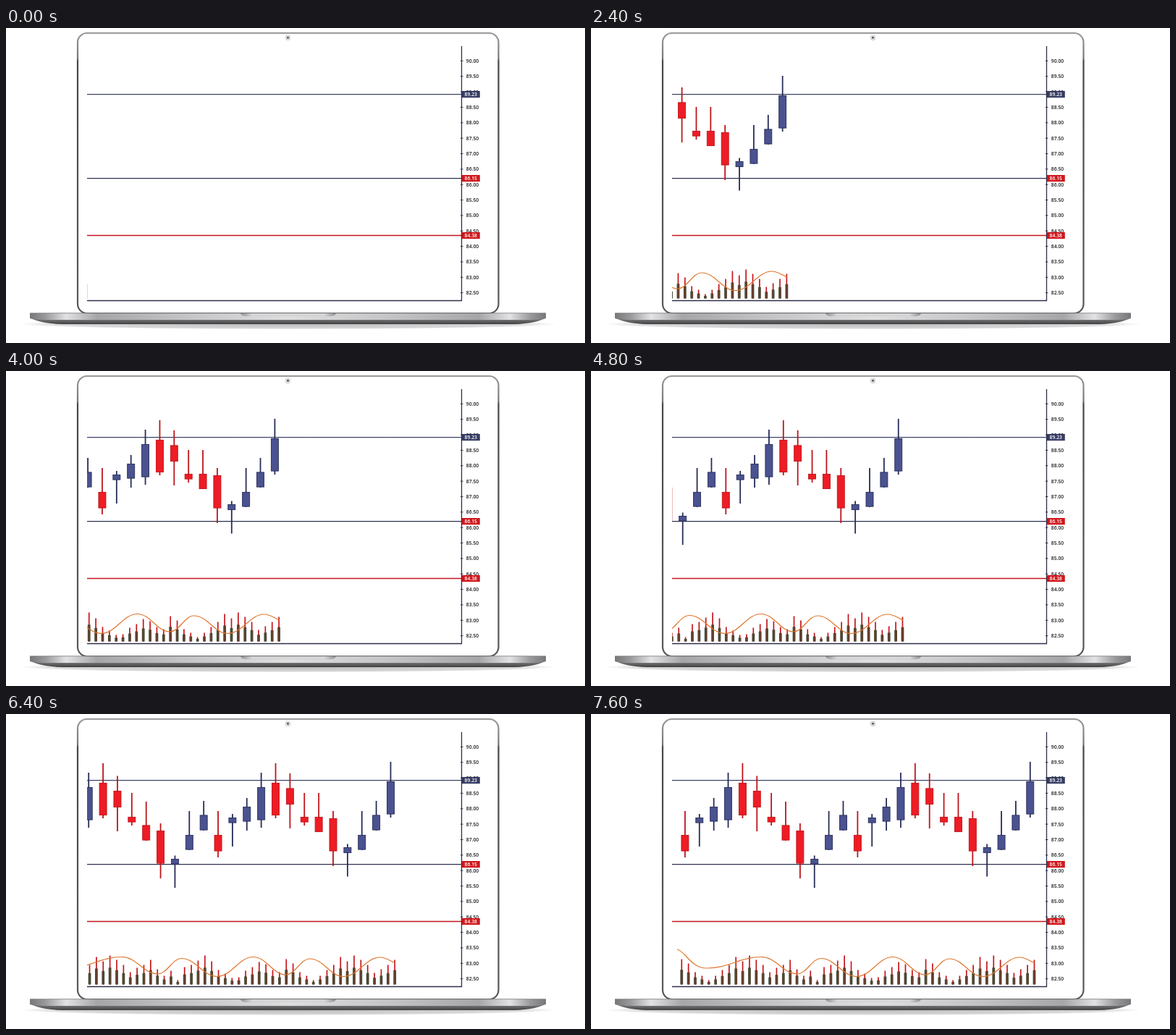
Animation, 800 px wide and 435 px high, one loop 10000 ms. Source, as an HTML page:

```html
<!DOCTYPE html>
<html lang="en">
<head>
<meta charset="utf-8">
<title>Candlestick chart on a laptop</title>
<style>
  html, body { margin: 0; width: 100%; height: 100%; overflow: hidden; background: #fff; }
  svg { display: block; width: 100%; height: 100%; }
  text { font: 600 6.8px "Open Sans", "Noto Sans", sans-serif; fill: #1c1c22; }
  .tag { fill: #fff; }
</style>
</head>
<body>
<svg viewBox="0 0 800 435">
  <defs>
    <linearGradient id="rim" x2="0" y2="1">
      <stop stop-color="#9a9a9c"/><stop offset=".09" stop-color="#77777a"/>
      <stop offset=".1" stop-color="#464649"/><stop offset="1" stop-color="#58585b"/>
    </linearGradient>
    <linearGradient id="deck">
      <stop stop-color="#77777a"/><stop offset=".03" stop-color="#99999c"/>
      <stop offset=".07" stop-color="#e2e2e4"/><stop offset=".13" stop-color="#a6a6a9"/>
      <stop offset=".3" stop-color="#c4c4c6"/><stop offset=".5" stop-color="#dededf"/>
      <stop offset=".7" stop-color="#c4c4c6"/><stop offset=".87" stop-color="#a6a6a9"/>
      <stop offset=".93" stop-color="#e2e2e4"/><stop offset=".97" stop-color="#99999c"/>
      <stop offset="1" stop-color="#77777a"/>
    </linearGradient>
    <linearGradient id="under" x2="0" y2="1">
      <stop stop-color="#8c8c8f"/><stop offset="1" stop-color="#3f3f42"/>
    </linearGradient>
    <linearGradient id="notch">
      <stop stop-color="#8b8b8e"/><stop offset=".12" stop-color="#d4d4d6"/>
      <stop offset=".88" stop-color="#d4d4d6"/><stop offset="1" stop-color="#8b8b8e"/>
    </linearGradient>
    <radialGradient id="shadow">
      <stop stop-color="#bbb"/><stop offset=".85" stop-color="#d8d8d8"/>
      <stop offset="1" stop-color="#fff"/>
    </radialGradient>
    <clipPath id="plot"><path d="M112 20H629V376H112Z"/></clipPath>
  </defs>

  <ellipse cx="390" cy="409" rx="372" ry="7" fill="url(#shadow)"/>
  <rect x="99" y="7" width="581.5" height="387" rx="13" fill="#fff" stroke="url(#rim)" stroke-width="2.2"/>
  <circle cx="389.5" cy="13.5" r="3.4" fill="#e3e3e3" stroke="#bbb" stroke-width=".6"/>
  <circle cx="389.5" cy="13.3" r="1.5" fill="#555"/>
  <path d="M33 400Q46 408 78 409H702Q734 408 746 400Z" fill="url(#under)"/>
  <path d="M33 394H746V401Q739 403 715 403H65Q40 403 33 401Z" fill="url(#deck)"/>
  <path d="M33 393.7H746" stroke="#77777a" stroke-width=".8"/>
  <path d="M324 394H456Q455 398 447 398H333Q325 398 324 394Z" fill="url(#notch)"/>

  <g id="grid" fill="#efefef"></g>
  <g fill="none" stroke-width="1.2">
    <path d="M112 91.6H630" stroke="#3d4369"/>
    <path d="M112 207.6H630" stroke="#2f3352"/>
    <path d="M112 286.5H630" stroke="#c4161c" stroke-width="1.4"/>
  </g>
  <g clip-path="url(#plot)"><g id="series"></g></g>
  <path d="M629.5 25V376.5H112" fill="none" stroke="#2d2f48" stroke-width="1.3"/>
  <g id="axis"></g>
</svg>
<script>
const LOOP = 10000, STEP = 100;
const SPEED = 0.0667, TRAVEL = 502.2;
const LAST_VOLUME_X = 612.5, VOLUME_GAP = 9.37;
const LAST_CANDLE_X = 606.8, CANDLE_GAP = 19.87;
const BLUE = { body: "#4a5290", edge: "#272d57" };
const RED = { body: "#ee1c24", edge: "#bd151b" };

const $ = id => document.getElementById(id);

function add(parent, tag, attrs, text = "") {
  const node = document.createElementNS(parent.namespaceURI, tag);
  for (const key in attrs) node.setAttribute(key, attrs[key]);
  node.textContent = text;
  return parent.appendChild(node);
}

// Each shape: high, body top, body bottom, low.
const shapes = {
  a: [134, 167, 189.5, 198], B: [138, 143, 150.5, 183], C: [116, 128, 148.5, 161],
  D: [81, 101, 146.5, 157], e: [68, 95, 140, 144], f: [85.5, 106, 129, 162],
  g: [109, 142, 149.5, 154], h: [121, 153.5, 174.5, 175], i: [151, 161, 206.5, 227],
  J: [195.5, 200, 207.5, 240], K: [134, 167, 187.5, 188], L: [120, 139.5, 160.5, 161],
  m: [82, 102.5, 125, 158], n: [109, 142, 163, 163], o: [134, 144, 189.5, 210],
  P: [179.5, 184, 192, 224.5], Q: [66, 93, 138.5, 143]
};
const candleOrder = "aBCDefghiJKLaBCDemgnoPKLQ"; // upper case rises, lower case falls

const volumes = [
  35, 29, 17, 12, 6, 12, 20, 27, 38, 32, 40, 34, 27, 17, 23, 27, 34, 21, 12, 19, 6,
  24, 27, 33, 40, 32, 20, 15, 9, 10, 19, 24, 31, 28, 20, 17, 35, 29, 17, 12, 6,
  12, 20, 27, 38, 32, 40, 34, 27, 16, 21, 27, 34
];

const wave = [
  [160, 351], [236, 335.5], [285, 359], [318, 337.5], [367, 362.5], [417, 335.5],
  [462, 360], [495, 338], [542, 362.5], [592, 336], [622, 346]
];

function drawCandles(parent) {
  [...candleOrder].forEach((key, i) => {
    const [high, top, bottom, low] = shapes[key];
    const color = key < "a" ? BLUE : RED;
    const x = LAST_CANDLE_X - CANDLE_GAP * (candleOrder.length - 1 - i);
    add(parent, "path", { d: `M${x} ${high}V${low}`, stroke: color.edge, "stroke-width": 1.8 });
    add(parent, "rect", {
      x: x - 5, y: top + 0.4, width: 10, height: bottom - top - 0.8,
      fill: color.body, stroke: color.edge, "stroke-width": 0.9
    });
  });
}

function drawVolumes(parent) {
  volumes.forEach((height, i) => {
    const x = LAST_VOLUME_X - VOLUME_GAP * (volumes.length - 1 - i);
    const bar = (h, stroke, width) =>
      add(parent, "path", { d: `M${x} 373.5v${-h}`, stroke, "stroke-width": width });
    bar(height, "#c4161c", 1.7);
    bar(height * 0.58, "#4b4a36", 3.8);
    bar(height * 0.58, "#7d3527", 1);
  });
}

function drawWave(parent) {
  let d = "M119 325C130 327 138 351 160 351";
  for (let i = 1; i < wave.length; i++) {
    const [x0, y0] = wave[i - 1], [x1, y1] = wave[i];
    const reach = (x1 - x0) * 0.4;
    d += `C${x0 + reach} ${y0} ${x1 - reach} ${y1} ${x1} ${y1}`;
  }
  add(parent, "clipPath", { id: "waveEnd" });
  add($("waveEnd"), "rect", { x: 110, y: 320, width: 503, height: 50 });
  add(parent, "path", {
    d, fill: "none", stroke: "#e0752a", "stroke-width": 1.2, "clip-path": "url(#waveEnd)"
  });
}

function drawAxis(parent) {
  for (let i = 0; i < 16; i++) {
    const y = 45.4 + i * 21.35;
    add(parent, "path", { d: `M628 ${y}h3.5`, stroke: "#2d2f48" });
    add(parent, "text", { x: 635.8, y: y + 2.5 }, (90 - i / 2).toFixed(2));
    for (const x of [313, 420, 527]) add($("grid"), "rect", { x, y, width: 1, height: 1 });
  }
  const tags = [[91.6, "89.23", "#363c62"], [207.6, "86.15", "#cf181d"], [286.5, "84.38", "#cf181d"]];
  for (const [y, label, fill] of tags) {
    add(parent, "rect", { x: 630, y: y - 4.6, width: 24.8, height: 9.2, fill });
    add(parent, "text", { x: 633.5, y: y + 2.5, class: "tag" }, label);
  }
}

const series = $("series");
drawCandles(series);
drawVolumes(series);
drawWave(series);
drawAxis($("axis"));

function render() {
  const time = Math.floor(performance.now() % LOOP / STEP) * STEP;
  const shift = Math.min(time * SPEED, TRAVEL) - TRAVEL;
  series.setAttribute("transform", `translate(${shift} 0)`);
  requestAnimationFrame(render);
}
render();
</script>
</body>
</html>
```
